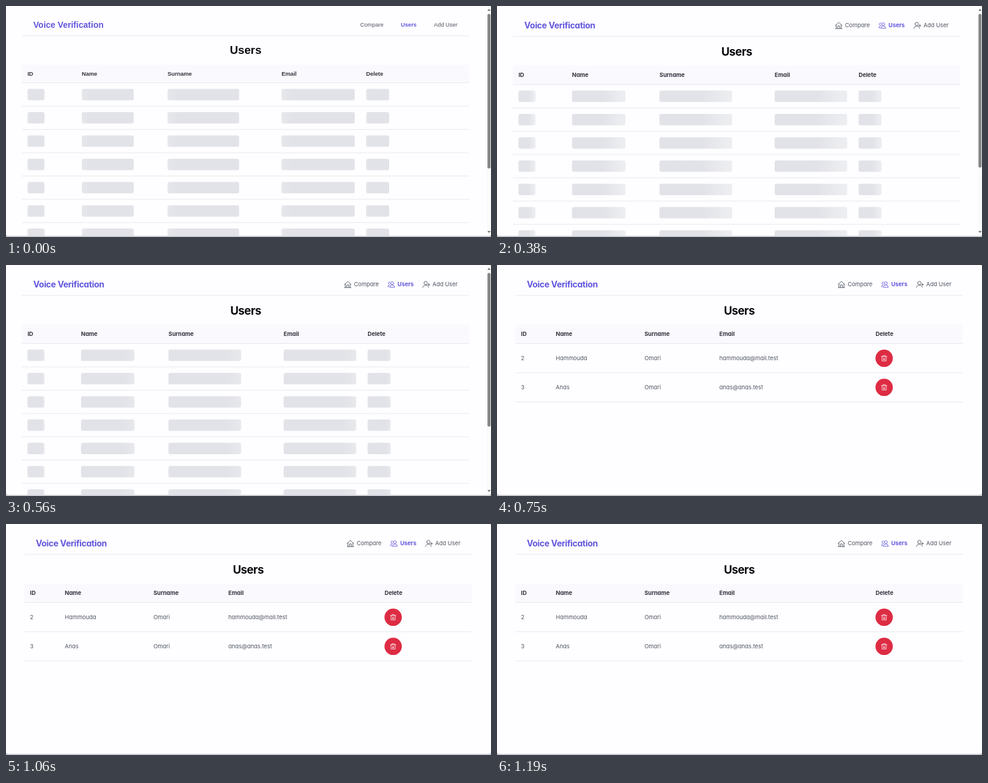
These frames come from a looping animation (800 px wide and 381 px high, 1250 ms). An HTML page:

```html
<!DOCTYPE html>
<html lang="en">
<head>
<meta charset="utf-8">
<title>Users table loading</title>
<style>
  html, body { margin: 0; width: 100%; height: 100%; overflow: hidden; background: #c4c4cb; }
  svg { display: block; width: 800px; height: 381px; }
  text { font-size: 9.37px; fill: #4f5661; }
  .fallback { font-family: "Liberation Sans", Arial, sans-serif; }
  .inter { font-family: Inter, sans-serif; font-feature-settings: "cv11"; font-optical-sizing: none; }
  .title { font-size: 14.06px; font-weight: 700; fill: #6257dc; }
  .heading { font-size: 18.74px; font-weight: 700; fill: #0a0a0f; text-anchor: middle; }
  .inter .title { letter-spacing: -.022em; }
  .inter .heading { letter-spacing: -.03em; }
  .active { font-weight: 700; fill: #6257dc; }
  .th { font-weight: 700; fill: #34343f; }
  .icon { fill: none; stroke: #4f5661; stroke-width: .9; stroke-linecap: round; stroke-linejoin: round; }
  .icon.on { stroke: #6257dc; }
  .icon.white { stroke: #fff; stroke-width: .8; }
  .rule { stroke: #e8e8ee; stroke-width: 1; }
</style>
</head>
<body>
<svg viewBox="0 0 800 381">
  <defs>
    <linearGradient id="shimmer">
      <stop offset="0" stop-color="#ecedf0"/>
      <stop offset=".22" stop-color="#e2e3e8"/>
      <stop offset=".78" stop-color="#e2e3e8"/>
      <stop offset="1" stop-color="#ecedf0"/>
    </linearGradient>
    <clipPath id="page"><path d="M0 0H797Q800 0 800 3V375Q800 379.3 796 379.3H4Q0 379.3 0 375Z"/></clipPath>
  </defs>
  <g clip-path="url(#page)">
    <rect width="800" height="381" fill="#fefdff"/>
    <g id="stage"></g>
  </g>
</svg>
<script>
const LOOP = 1250, SWAP_FONT = 380, LOADED = 750;
const HEADS = ["ID", "Name", "Surname", "Email", "Delete"];
const USERS = [
  ["2", "Hammouda", "Omari", "hammouda@mail.test"],
  ["3", "Anas", "Omari", "anas@anas.test"],
];
const ICONS = {
  home: "M-5.5 .2L0 -5L5.5 .2M-4.1 -1V5.2M4.1 -1V5.2M-5.3 5.2H5.3M-1.6 5.2V.9H1.6V5.2",
  users: "M-.9 -2a2.4 2.4 0 1 0 4.8 0a2.4 2.4 0 1 0 -4.8 0M-2.6 4.4Q-2 .9 1.5 .9T5.6 4.4Z" +
    "M-2 -3.6a1.9 1.9 0 1 0 -.3 3.3M-3.2 1Q-5.4 1.4 -5.7 3.8H-4",
  add: "M-3.8 -2.3a2.8 2.8 0 1 0 5.6 0a2.8 2.8 0 1 0 -5.6 0M-5.7 5Q-5.2 1.2 -1 1.2T3.7 5M4.2 -1.4V2M2.5 .3H5.9",
  trash: "M-4.5 -2.8H4.5M-1.7 -2.8V-4.5H1.7V-2.8M-3.5 -2.8V4.5H3.5V-2.8M-1.1 -.2V2.4M1.1 -.2V2.4M-1.1 2.4H1.1",
};

const text = (x, y, s, cls = "") => `<text x="${x}" y="${y}" class="${cls}">${s}</text>`;
const rule = (x, y) => `<path class="rule" d="M${x} ${y}h738"/>`;
const icon = (name, x, y, cls = "") =>
  `<path class="icon ${cls}" transform="translate(${x} ${y})" d="${ICONS[name]}"/>`;

// Header, heading and table head; "drop" moves the heading block down.
function frame({ left, nav, cols, baseline, headY, headH, headingY, icons }) {
  const items = ["Compare", "Users", "Add User"];
  return text(left + 19, baseline + 2, "Voice Verification", "title") +
    items.map((s, i) => text(nav[i], baseline, s, i === 1 ? "active" : "")).join("") +
    (icons ? ["home", "users", "add"].map((n, i) => icon(n, nav[i] - 10.3, 32, i === 1 ? "on" : "")).join("") : "") +
    rule(left, headY - 48) +
    text(left + 369.3, headingY, "Users", "heading") +
    `<rect x="${left}" y="${headY}" width="738" height="${headH}" fill="#faf9fd"/>` +
    rule(left, headY + headH) +
    HEADS.map((s, i) => text(cols[i], headY + headH / 2 + 3.2, s, "th")).join("");
}

function skeleton({ left, cols, widths, headY, headH }) {
  let out = "";
  for (let row = 0; row < 7; row++) {
    const y = headY + headH + 10.1 + row * 38.4;
    cols.forEach((x, i) => {
      out += `<rect x="${x}" y="${y}" width="${widths[i]}" height="18.74" rx="3.2" fill="url(#shimmer)"/>`;
    });
    out += rule(left, y + 28.5);
  }
  return out;
}

const scrollbar = end =>
  `<rect x="793" width="7" height="380" fill="#fafafb"/>
   <rect x="794.2" y="13" width="5" height="${end - 13}" rx="2.5" fill="#858588"/>
   <path d="M794.2 8L796.8 4.4L799.4 8ZM794.2 371L796.8 374.6L799.4 371Z" fill="#77777b"/>`;

const userRows = cols => USERS.map((user, row) => {
  const y = 153.8 + row * 48;
  return user.map((s, i) => text(cols[i], y + 3.4, s)).join("") +
    `<circle cx="638.6" cy="${y}" r="14.3" fill="#dd2c43"/>` +
    icon("trash", 638.6, y, "white") + rule(30, y + 24);
}).join("");

const plain = {
  left: 26, nav: [584.3, 651.3, 705.8], cols: [35.4, 125, 266.5, 454.4, 594],
  widths: [28, 85.7, 118, 120.8, 38], baseline: 34.3, headY: 97, headH: 29.6, headingY: 79.4,
};
const styled = {
  left: 26, nav: [574, 645.8, 703.6], cols: [35.4, 123.8, 268, 458, 596.5],
  widths: [28, 88, 119.8, 119.6, 37.8], baseline: 35.2, headY: 98, headH: 31.5, headingY: 81.5, icons: true,
};
const loaded = {
  ...styled, left: 30.2, nav: styled.nav.map(x => x + 4.4), cols: [39.5, 97, 243.2, 366.8, 624.4],
};

const group = (cls, body) => `<g class="${cls}">${body}</g>`;
const stage = document.getElementById("stage");
stage.innerHTML =
  group("fallback", frame(plain) + skeleton(plain) + scrollbar(268)) +
  group("inter", frame(styled) + skeleton(styled) + scrollbar(266.5)) +
  group("inter", frame(loaded) + userRows(loaded.cols));
const scenes = [...stage.children];
const shimmer = document.getElementById("shimmer");

function shimmerStart(t) {
  if (t < 60) return -.2;
  if (t < SWAP_FONT) return .08;
  return -.62 + .073 * Math.min(3, Math.floor((t - SWAP_FONT) / 60));
}

function draw() {
  const t = performance.now() % LOOP;
  const current = t < SWAP_FONT ? 0 : t < LOADED ? 1 : 2;
  scenes.forEach((scene, i) => { scene.style.display = i === current ? "" : "none"; });
  const start = shimmerStart(t);
  shimmer.setAttribute("x1", start);
  shimmer.setAttribute("x2", start + 1.55);
  requestAnimationFrame(draw);
}
draw();
</script>
</body>
</html>
```
